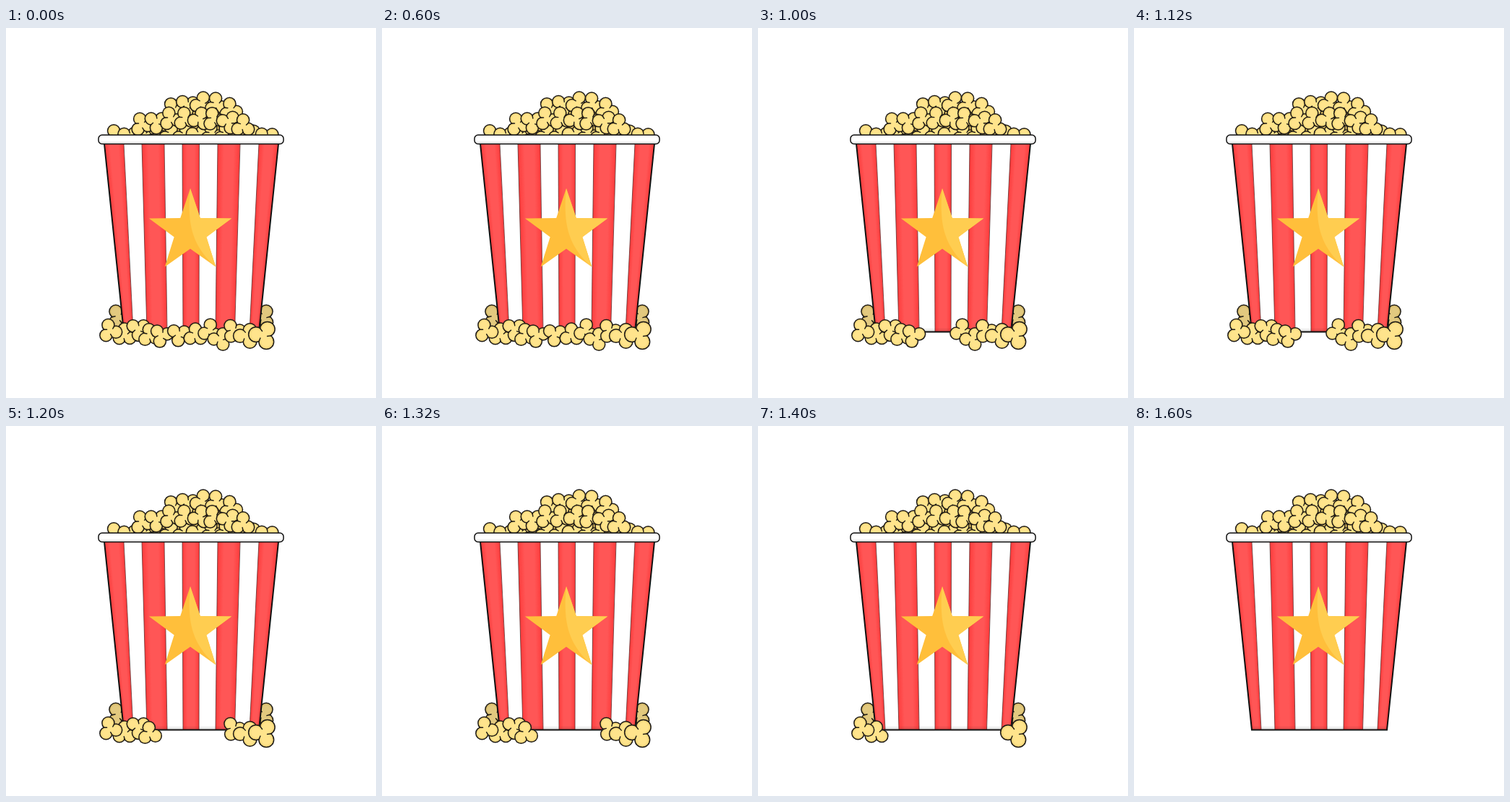
An HTML page with a canvas for the animation above (1.7 s loop, 512 by 512 pixels).

```html
<!DOCTYPE html>
<html lang="en">
<head>
<meta charset="utf-8">
<title>Popcorn</title>
<style>
html, body { margin: 0; width: 100%; height: 100%; overflow: hidden; background: #fff; }
canvas { display: block; width: 512px; height: 512px; }
</style>
</head>
<body>
<canvas id="stage" width="512" height="512"></canvas>
<script>
const ctx = document.getElementById('stage').getContext('2d');
const INK = '#1c1914';
const LOOP = 1700, HOLD = 1000, STEP = 200;
const MID = 256, TOP = 160, BOTTOM = 420.5;

// Spilled kernels: x, y, direction of the first lobe in degrees
const spilled = [
  [164, 425, -91], [144, 419, -108], [183, 416.5, 90], [199, 425.5, -98],
  [215, 425.5, -135], [239, 424, -145], [262, 425, -90], [282, 419, -85],
  [296, 430.5, -60], [315, 419, -123], [333, 426, 180], [356, 425, 185]
];
const stripes = [[136, 163], [163, 176], [188, 195], [219, 223], [244, 245],
                 [267.5, 267], [293, 290], [324, 316.5], [350, 337], [377, 350]];

const lerp = (a, b, t) => a + (b - a) * t;
const polar = (x, y, r, deg) => {
  const a = deg * Math.PI / 180;
  return [x + Math.cos(a) * r, y + Math.sin(a) * r];
};

function random(seed) {
  return () => (seed = seed * 16807 % 2147483647) / 2147483647;
}

function poly(points) {
  ctx.beginPath();
  points.forEach(([x, y]) => ctx.lineTo(x, y));
  ctx.closePath();
}

function disc([x, y], r, fill) {
  ctx.beginPath();
  ctx.arc(x, y, r, 0, Math.PI * 2);
  ctx.fillStyle = fill;
  ctx.fill();
}

function line(...points) {
  ctx.beginPath();
  points.forEach(([x, y]) => ctx.lineTo(x, y));
  ctx.stroke();
}

// Three merged lobes with a short crease in each notch
function kernel(x, y, r, deg, light = '#ffe48c', dark = '#efcf70') {
  const turns = [0, 120, 240].map(a => deg + a);
  const lobes = turns.map(a => polar(x, y, r * 0.97, a));
  lobes.forEach(p => disc(p, r + 0.7, INK));
  lobes.forEach(p => {
    const glow = ctx.createRadialGradient(...p, r * 0.6, ...p, r);
    glow.addColorStop(0, light);
    glow.addColorStop(1, dark);
    disc(p, r - 0.8, glow);
  });
  disc([x, y], r * 0.75, light);
  ctx.strokeStyle = INK;
  ctx.lineWidth = 1.4;
  ctx.lineCap = 'round';
  turns.forEach(a => line(polar(x, y, r, a + 60), polar(x, y, r * 0.55, a + 70)));
}

// A row of kernels sagging towards both ends; every fifth one points down
function heapRow(count, left, right, y, sag, seed) {
  const rnd = random(seed);
  for (let i = 0; i < count; i++) {
    const t = i / (count - 1);
    const drop = sag * (2 * t - 1) ** 2;
    const deg = (i % 5 === 1 ? 90 : -90) + (rnd() - 0.5) * 40;
    kernel(lerp(left, right, t), y + drop + rnd() * 3, 8.6, deg);
  }
}

function drawHeap() {
  ctx.save();
  ctx.beginPath();
  ctx.rect(0, 0, 512, 150);
  ctx.clip();
  poly([[150, 150], [245, 104], [290, 106], [366, 150]]);
  ctx.fillStyle = '#e9c768';
  ctx.fill();
  heapRow(5, 231, 311, 103, 9, 71);
  heapRow(12, 152, 361, 146, 4, 23);
  heapRow(8, 188, 328, 123, 10, 47);
  ctx.restore();
}

function drawStripe([t0, b0], [t1, b1], red) {
  const layers = red ? 9 : 1;
  for (let k = 0; k < layers; k++) {
    const m = k / 30;
    poly([[lerp(t0, t1, m), TOP], [lerp(t1, t0, m), TOP],
          [lerp(b1, b0, m), BOTTOM], [lerp(b0, b1, m), BOTTOM]]);
    const tint = 62 + k * 3;
    ctx.fillStyle = red ? `rgb(255,${tint},${tint})` : '#fff';
    ctx.fill();
  }
}

function drawTub() {
  stripes.slice(1).forEach((s, i) => drawStripe(stripes[i], s, i % 2 === 0));
  const [first, last] = [stripes[0], stripes.at(-1)];
  const outline = [[first[0], TOP], [last[0], TOP], [last[1], BOTTOM], [first[1], BOTTOM]];

  const shade = ctx.createLinearGradient(0, BOTTOM - 6, 0, BOTTOM);
  shade.addColorStop(0, 'rgba(0,0,0,0)');
  shade.addColorStop(1, 'rgba(0,0,0,.15)');
  poly(outline);
  ctx.fillStyle = shade;
  ctx.fill();

  ctx.lineCap = 'butt';
  ctx.strokeStyle = '#5b2525';
  ctx.lineWidth = 0.8;
  stripes.slice(1, -1).forEach(([t, b]) => line([t, TOP], [b, BOTTOM]));
  poly(outline);
  ctx.strokeStyle = '#111';
  ctx.lineWidth = 2;
  ctx.stroke();

  const rim = ctx.createLinearGradient(0, 148, 0, 160);
  rim.addColorStop(0, '#eee');
  rim.addColorStop(0.3, '#fff');
  rim.addColorStop(0.65, '#fff');
  rim.addColorStop(1, '#e2e2e2');
  ctx.beginPath();
  ctx.roundRect(128, 148, 256, 12.5, 5);
  ctx.fillStyle = rim;
  ctx.fill();
  ctx.lineWidth = 1.5;
  ctx.stroke();
}

function drawStar() {
  poly(Array.from({ length: 10 }, (_, i) => polar(255, 282, i % 2 ? 23.5 : 60, i * 36 - 90)));
  ctx.fillStyle = '#ffbf3b';
  ctx.fill();
  ctx.save();
  ctx.clip();
  ctx.beginPath();
  ctx.moveTo(255, 220);
  ctx.bezierCurveTo(251, 265, 254, 300, 291, 331);
  ctx.lineTo(320, 331);
  ctx.lineTo(320, 220);
  ctx.fillStyle = '#ffcd50';
  ctx.fill();
  ctx.restore();
}

// The spill clears from the middle outwards, one ring per step
function drawSpill(step) {
  spilled.forEach(([x, y, deg]) => {
    const ring = 1 + Math.floor((Math.abs(x - MID) + 4) / 30);
    if (step < ring) kernel(x, y, 8.6 + Math.max(0, x - 315) / 23, deg);
  });
}

function draw(ms) {
  const step = ms < HOLD ? 0 : 1 + Math.floor((ms - HOLD) / STEP);
  ctx.fillStyle = '#fff';
  ctx.fillRect(0, 0, 512, 512);
  drawHeap();
  if (step < 4) {
    for (const side of [-1, 1]) {
      kernel(MID + side * 100, 400, 9, -90 + side * 28, '#e2c97f', '#d0b35d');
    }
  }
  drawTub();
  drawStar();
  drawSpill(step);
}

const start = performance.now();
function tick() {
  draw((performance.now() - start) % LOOP);
  requestAnimationFrame(tick);
}
tick();
</script>
</body>
</html>
```
